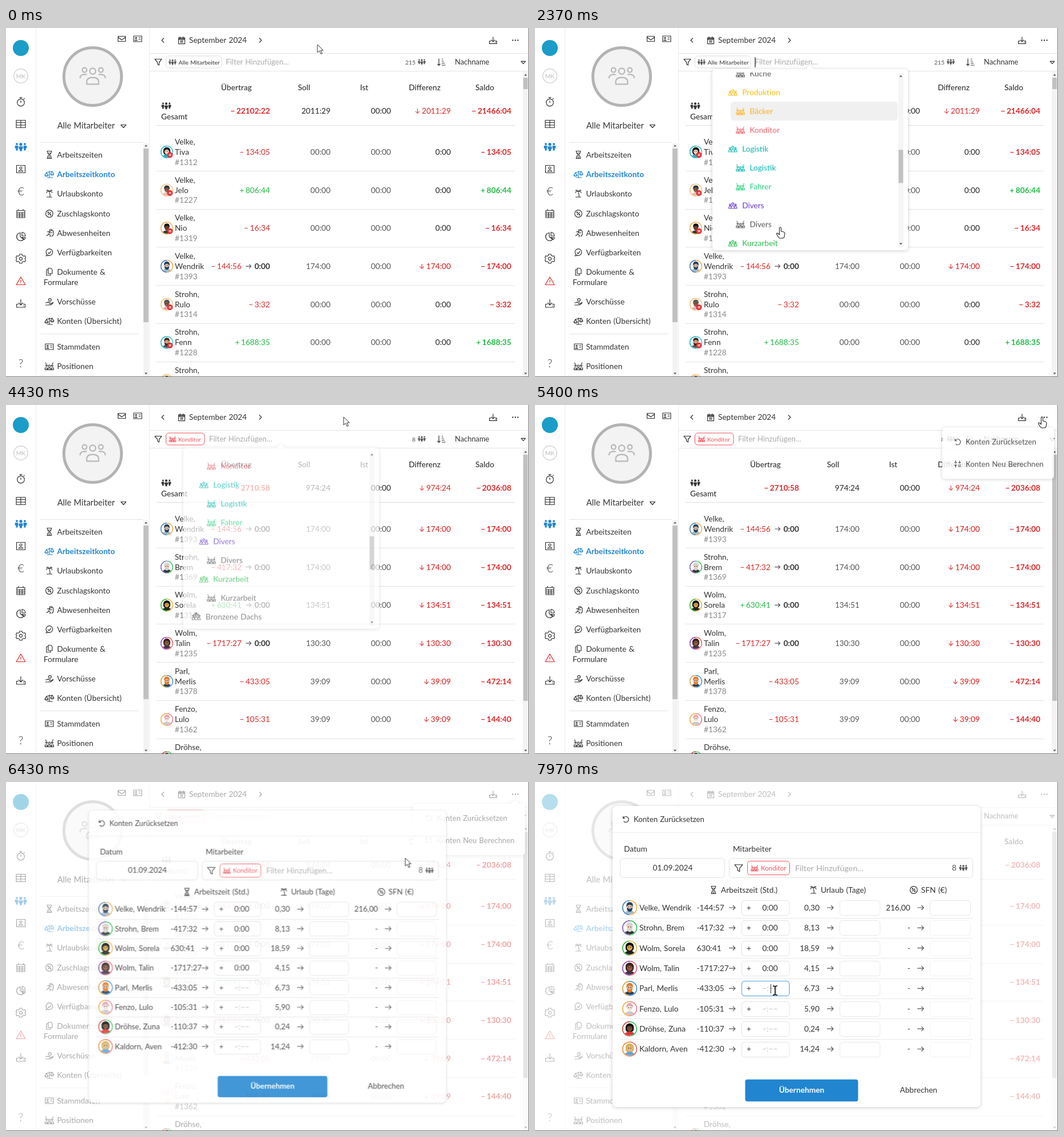
These frames come from a looping animation (917 by 611 pixels, 8000 ms). An HTML page:

```html
<!DOCTYPE html>
<html lang="de">
<head>
<meta charset="utf-8">
<title>Arbeitszeitkonto</title>
<style>
  html, body { margin: 0; width: 100%; height: 100%; overflow: hidden; background: #fff; }
  svg { display: block; }
  text { font-family: Lato, "Open Sans", sans-serif; font-size: 13.7px; fill: currentColor; word-spacing: .06em; white-space: pre; }
  .b { font-weight: 700; }
  .m { font-weight: 500; }
  .e { text-anchor: end; }
  .c { text-anchor: middle; }
  .s { font-size: 10.4px; }
  .hint { font-size: 13.2px; }
  .sign { font-size: 20px; font-weight: 300; }
  .arr { font-family: Inter, sans-serif; font-size: 12px; }
  .popup { filter: drop-shadow(0 1px 3px rgba(0,0,0,.2)); }
  #modal { transform-origin: 458.5px 305px; }
</style>
</head>
<body>
<svg id="stage" width="917" height="611" viewBox="0 0 917 611" color="#333"></svg>
<script>
const LOOP = 8000;
const RED = '#db2828', GREEN = '#21ba45', BLUE = '#2185d0', ROSE = '#f2545b', GREY = '#555', HINT = '#aaa';

// ---- drawing helpers ----
const ring = (x, y, r) => `M${x - r} ${y}a${r} ${r} 0 1 0 ${2 * r} 0a${r} ${r} 0 1 0 ${-2 * r} 0`;
const text = (x, y, s, cls = '', color = '#333') => `<text x="${x}" y="${y + 4.8}" class="${cls}" color="${color}">${s}</text>`;
const path = (d, color = '#333', w = 1.2, fill = 'none') => `<path d="${d}" fill="${fill}" stroke="${color}" stroke-width="${w}" stroke-linejoin="round"/>`;
const box = (x, y, w, h, fill, stroke = 'none', r = 0) => `<rect x="${x}" y="${y}" width="${w}" height="${h}" rx="${r}" fill="${fill}" stroke="${stroke}"/>`;
const hline = (x1, x2, y, color = '#e4e4e4') => path(`M${x1} ${y}H${x2}`, color, 1);
const tri = (x, y, dir) => path(`M${x - 2.5} ${y + 1.5 * dir}h5l-2.5 ${-3 * dir}Z`, 'none', 0, GREY);
const group = (id, s, attrs = '') => `<g id="${id}" ${attrs}>${s}</g>`;

const crew = ring(0, -3, 1.9) + ring(-5, -1, 1.4) + ring(5, -1, 1.4) + 'M-3.5 5Q0-4 3.5 5M-8 5Q-5-2-2.5 3M8 5Q5-2 2.5 3M-8 5.5H8';
const solid = {
  people: ring(0, -4, 2.4) + ring(-6.5, -4.5, 1.8) + ring(6.5, -4.5, 1.8) +
    'M-3.2-.7H3.2V3.5L1.8 4V7H-1.8V4L-3.2 3.5ZM-9.5-1.8H-4.3V2.5H-5V6H-8V2.5H-9.5ZM9.5-1.8H4.3V2.5H5V6H8V2.5H9.5Z',
  dots: ring(-4.5, 0, 1.2) + ring(0, 0, 1.2) + ring(4.5, 0, 1.2)
};
const outline = {
  mail: 'M-6.5-4.5H6.5V4.5H-6.5ZM-6.5-3L0 2L6.5-3',
  card: 'M-7-5H7V5H-7ZM-5 3Q-3 0-1 3ZM1.5-2H5M1.5 1H5' + ring(-3, -1.5, 1.2),
  watch: ring(0, 1.5, 6.3) + 'M-2.5-7.5H2.5M0-7.5V-5M0 2V-2M5-4.5L6.5-6',
  table: 'M-8-6.5H8V6.5H-8ZM-8-2.5H8M-8 2H8M0-6.5V6.5',
  badge: 'M-7.5-6.5H7.5V6.5H-7.5ZM-4 4Q0-1 4 4Z' + ring(0, -2, 2),
  month: 'M-7-5.5H7V7H-7ZM-7-2H7M-7 1H7M-7 4H7M-2.3-2V7M2.3-2V7M-4-8V-5M4-8V-5',
  day: 'M-5-4H5V5.5H-5ZM-5-2.5H5M-5-1.3H5M-2.5-6V-3M2.5-6V-3M-2.5 1H2.5M-2.5 3H2.5',
  pie: 'M-1-6.5A7 7 0 1 0 5 5L-1 .5ZM2-7.5A7 7 0 0 1 8-1H2ZM2 1.5H8Q8 4 6.5 5Z',
  gear: 'M-2-8H2L2.6-5.7L5-4.5L7.3-5.2L8.5-2L7-0L8.5 2L7.3 5.2L5 4.5L2.6 5.7L2 8H-2L-2.6 5.7L-5 4.5L-7.3 5.2L-8.5 2L-7 0L-8.5-2L-7.3-5.2L-5-4.5L-2.6-5.7Z' + ring(0, 0, 2.6),
  warn: 'M0-7L8 6.5H-8ZM0-2V2.5M0 4V5',
  save: 'M0-7V3M-4-1L0 3L4-1M-4 1.5H-7.5V7H7.5V1.5H4M4 4.5H5.5',
  hourglass: 'M-4.5-6.5H4.5M-4.5 6.5H4.5M-3.5-6.5Q-3.5-2 0 0Q3.5 2 3.5 6.5M3.5-6.5Q3.5-2 0 0Q-3.5 2-3.5 6.5M-2-3H2M-2 5H2M-1 3H1',
  scale: 'M0-6V6M-4 6H6M-5-3L5-5M-8 2L-5-3L-2 2ZM2 0L5-5L8 0ZM-8 2Q-5 6-2 2M2 0Q5 4 8 0',
  palm: 'M0-2Q2 2 1 6M-5 6H5M0-3Q-4-6-5-1M0-3Q4-6 5-1M0-3Q-2-8-5-5M0-3Q2-8 5-5',
  percent: ring(0, 0, 6.3) + 'M-2.5 2.5L2.5-2.5' + ring(-2, -2, .8) + ring(2, 2, .8),
  runner: ring(2, -5, 1.5) + 'M-4-2L0-3L2 0L5-1M0-3L-1 2L2 4L1 7M-1 2L-5 5M4-6L7-3V3L4 6',
  chat: ring(0, -.5, 5.8) + 'M-4 3.5L-6 6L-1 5.3M-2.5 0L-.5 2L3-2',
  copy: 'M-2-6.5H3L5-4V3H-2ZM-2-4H-5V6H2V3',
  hand: 'M-7 2H-4Q-2 0 0 2H3M-1 4H3L7 1M-7 6H2L7 2' + ring(1, -3, 2.4),
  crew,
  house: 'M-8-1L0-7L8-1' + crew,
  seats: ring(0, 0, 1.8) + ring(-5, -1, 1.4) + ring(5, -1, 1.4) + 'M-7-6L-5-4M7-6L5-4M-7.5 6V3H-4V6M7.5 6V3H4V6M-2.5 6V3.5H2.5V6M-8 6.3H8',
  tag: 'M-5.5-5H0L5.5 1L1 5.5L-5.5-.5Z' + ring(-3, -2.5, .7),
  filter: 'M-6-5H6L1.5 .5V5.5L-1.5 3.5V.5Z',
  sort: 'M-4-6V6M-6.5 3.5L-4 6L-1.5 3.5M1-5H3M1-1.5H4.5M1 2H6M1 5.5H7.5',
  reset: 'M-4.5-5V-1.5H-1M-4.5-1.5A5 5 0 1 1-3.5 4',
  recalc: 'M-6-2.5H-1M-3.5-6V-1M1-2.5H6M3.5-5.5V-1M-6 2.5H-1M-3.5 1V6M1 2H6M1 4.5H6',
  arrow: 'M-5.5 0H5.5M1.5-4L5.5 0L1.5 4',
  left: 'M2-4L-2 0L2 4',
  right: 'M-2-4L2 0L-2 4',
  down: 'M-4.5-2.5H4.5L0 2.5Z',
  trio: ring(0, -6.5, 4) + ring(-11, -8, 3) + ring(11, -8, 3) + 'M-8 11V8Q-8 2 0 2Q8 2 8 8V11ZM-17 3Q-17-2-11-2H-8M17 3Q17-2 11-2H8'
};
function icon(name, x, y, color = '#333', k = 1, w = 1.2) {
  const shape = solid[name] ? path(solid[name], 'none', 0, color) : path(outline[name], color, w / k);
  return `<g transform="translate(${x} ${y}) scale(${k})">${shape}</g>`;
}

// ring start, ring end, skin, hair, shirt, style
const looks = {
  Tiva: ['#2bb5c4', '#2bb5c4', '#f3d2c0', '#111', '#2aa9b8', 'long'],
  Jelo: ['#f4c27a', '#f4c27a', '#8a5a44', '#333', '#e9b8b0', ''],
  Nio: ['#f0b04a', '#f0b04a', '#6b3f2e', '#111', '#333', ''],
  Wendrik: ['#f2a03c', '#2d7fd0', '#e9bfa5', '#24425f', '#9fb8c8', 'beard'],
  Rulo: ['#f4c27a', '#f4c27a', '#8a5a44', '#555', '#e3a9b4', ''],
  Fenn: ['#2bb5c4', '#2bb5c4', '#e5b08f', '#3b2a22', '#555', 'beard'],
  Brem: ['#21ba45', '#9b59d0', '#f0cdb8', '#d4d4d4', '#333', 'beard'],
  Sorela: ['#e0b030', '#21ba45', '#d6a33f', '#111', '#222', 'long'],
  Talin: ['#e05560', '#8e55c8', '#8a5a44', '#3c241c', '#4a3346', 'long'],
  Merlis: ['#2d7fd0', '#f2b03c', '#e6b48c', '#e07b2c', '#27405e', 'beard'],
  Lulo: ['#ee6a80', '#f2c23c', '#f6e5dc', '#e6a5ae', '#c8c8c8', ''],
  Zuna: ['#21ba45', '#e0404a', '#7a4a35', '#111', '#e0353a', 'long'],
  Aven: ['#e0555a', '#f2a03c', '#e3b58c', '#d8b25a', '#5aa7d8', 'long']
};
function avatar(x, y, k, name, badge) {
  const [a, b, skin, hair, shirt, style] = looks[name];
  const fill = (d, c) => path(d, 'none', 0, c);
  return `<g transform="translate(${x} ${y}) scale(${k})">` +
    path(ring(0, 0, 12), a, 1.4, '#fff') + path('M0-12A12 12 0 0 0 0 12', b, 1.4) + '<g clip-path="url(#face)">' +
    (style === 'long' ? box(-7, -9, 14, 15, hair, 'none', 6) : '') +
    `<ellipse cy="12" rx="9.5" ry="7.5" fill="${shirt}"/><ellipse cy="-1.5" rx="4.8" ry="6" fill="${skin}"/>` +
    fill('M-5.5-1Q-6.5-9.5 0-9.5Q6.5-9.5 5.5-1Q3-5 0-4.8Q-3-5-5.5-1Z', hair) +
    (style === 'beard' ? fill('M-4.9-1Q-5 7 0 7Q5 7 4.9-1Q3 2 0 2Q-3 2-4.9-1Z', hair) : '') +
    fill(ring(-1.9, -1.5, .8) + ring(1.9, -1.5, .8), '#222') + '</g>' +
    (badge ? fill(ring(6.3, 6, 5.7), '#e02b30') + path('M4 4.5H9M4 6H9M4 7.5H9', '#fff', .9) : '') + '</g>';
}

function amount(x, y, v, cls = '') {
  const sign = { '-': '−', '+': '+', v: '↓' }[v[0]];
  if (!sign) return text(x, y, v, 'e ' + cls, cls ? '#333' : GREY);
  return text(x, y, `<tspan class="${v[0] === 'v' ? 'arr' : ''}">${sign}</tspan><tspan dx="2.5">${v.slice(1)}</tspan>`,
    'e ' + cls, v[0] === '+' ? GREEN : RED);
}

// ---- page ----
function rail() {
  const icons = { watch: 129, table: 168, people: 208, badge: 247, month: 325, pie: 365, gear: 404, warn: 443, save: 482 };
  const tint = { people: BLUE, warn: RED };
  return `<circle cx="26" cy="35" r="14" fill="#1c9cc8"/>` + path(ring(26, 84, 12.3), '#ccc', 1.2) + text(26, 83.5, 'MK', 'c s', '#bbb') +
    Object.entries(icons).map(([n, y]) => icon(n, 26, y, tint[n], n === 'people' ? 1.08 : 1)).join('') +
    `<text x="26" y="293" class="c sign">€</text><text x="26" y="594" class="c sign">?</text>` +
    path('M52.5 0V611M251.5 0V611', '#ececec', 1);
}

function sidebar() {
  const items = [['hourglass', 222, 'Arbeitszeiten'], ['scale', 256, 'Arbeitszeitkonto'], ['palm', 290, 'Urlaubskonto'],
    ['percent', 325, 'Zuschlagskonto'], ['runner', 359, 'Abwesenheiten'], ['chat', 393, 'Verfügbarkeiten'],
    ['copy', 427, 'Dokumente &amp;'], ['hand', 479, 'Vorschüsse'], ['scale', 513, 'Konten (Übersicht)'],
    ['card', 558, 'Stammdaten'], ['seats', 592, 'Positionen']];
  return icon('mail', 203, 19) + icon('card', 231, 19) + path(ring(152, 85, 50.5), '#b3b3b3', 5, '#f3f3f3') +
    icon('trio', 152, 84, '#b8b8b8', 1.3, 2.2) +
    `<text x="90" y="176" style="font-size:14.5px">Alle Mitarbeiter</text>` + icon('down', 206, 172) +
    hline(60, 240, 200.5) + hline(60, 233, 535.5) +
    items.map(([n, y, s], i) => icon(n, 76, y, i === 1 ? BLUE : '#333') + text(89.5, y, s, i === 1 ? 'b' : '', i === 1 ? BLUE : '#333')).join('') +
    text(66, 445, 'Formulare') + box(241, 202, 9, 409, '#f3f3f3') + box(241, 211, 9, 304, '#c1c1c1') + tri(245.5, 206, 1) + tri(245.5, 605, -1);
}

const header = () => icon('left', 275, 21.5) + icon('day', 308, 21.5, '#333', 1.1) + text(321, 21.5, 'September 2024') + icon('right', 446, 21.5) +
  icon('save', 854, 21.5, '#333', .85) + icon('dots', 893, 21.5) + hline(252, 917, 44.5) + hline(252, 917, 75.5) +
  icon('filter', 267, 59.5) + icon('people', 729, 59, GREY, .7) + icon('sort', 763, 59.5) +
  `<text x="787" y="64" style="font-size:12.9px">Nachname</text>` + icon('down', 907, 60.5, '#333', .85) +
  [['Übertrag', 404], ['Soll', 522.5], ['Ist', 628], ['Differenz', 734], ['Saldo', 839.5]].map(([s, x]) => text(x, 104, s, 'c m')).join('') +
  icon('people', 281, 136, '#333', .88) + text(272, 155, 'Gesamt', 'm') + hline(264, 892, 170.5, '#ddd') +
  box(906, 77, 10, 534, '#f3f3f3') + tri(911, 82, 1) + tri(911, 605, -1);

const everyone = [
  ['Velke', 'Tiva', 1312, '-134:05', '00:00', '-134:05'], ['Velke', 'Jelo', 1227, '+806:44', '00:00', '+806:44'],
  ['Velke', 'Nio', 1319, '-16:34', '00:00', '-16:34'], ['Velke', 'Wendrik', 1393, '-144:56>', '174:00', '-174:00'],
  ['Strohn', 'Rulo', 1314, '-3:32', '00:00', '-3:32'], ['Strohn', 'Fenn', 1228, '+1688:35', '00:00', '+1688:35'],
  ['Strohn', 'Nio', 1230, '-1:00', '00:00', '-1:00']];
const bakers = [
  ['Velke', 'Wendrik', 1393, '-144:56>', '174:00', '-174:00'], ['Strohn', 'Brem', 1369, '-417:32>', '174:00', '-174:00'],
  ['Wolm', 'Sorela', 1317, '+630:41>', '134:51', '-134:51'], ['Wolm', 'Talin', 1235, '-1717:27>', '130:30', '-130:30'],
  ['Parl', 'Merlis', 1378, '-433:05', '39:09', '-472:14'], ['Fenzo', 'Lulo', 1362, '-105:31', '39:09', '-144:40'],
  ['Dröhse', 'Zuna', 1370, '-110:37', '39:09', '-149:46']];

function accountRow([last, first, id, carry, target, saldo], i) {
  const y = 217 + 66.7 * i, reset = carry.endsWith('>');
  return avatar(282, y, .87, first, target === '00:00') + text(296, y - 18, last + ',') + text(296, y, first) + text(296, y + 17.7, '#' + id, '', '#888') +
    (reset ? amount(413, y, carry.slice(0, -1)) + icon('arrow', 425, y, GREY, .85) + text(463, y, '0:00', 'e b') : amount(463, y, carry)) +
    amount(569, y, target) + amount(675, y, '00:00') + amount(780, y, target === '00:00' ? '0:00' : 'v' + target, 'm') +
    amount(886, y, saldo, 'b') + hline(264, 892, Math.round(y + 33) + .5);
}
const account = (rows, [carry, target, saldo], thumb) => amount(463, 145.5, carry, 'b') + amount(569, 145.5, target, 'm') +
  amount(675, 145.5, '00:00', 'm') + amount(780, 145.5, 'v' + target) + amount(886, 145.5, saldo, 'b') +
  box(907, 87, 8, thumb, '#c1c1c1') + rows.map(accountRow).join('');

const viewAll = () => account(everyone, ['-22102:22', '2011:29', '-21466:04'], 20) + box(280.5, 49, 97.5, 21, '#fff', '#ddd', 5) +
  icon('people', 292, 59.5, GREY, .7) + text(302.5, 58.8, 'Alle Mitarbeiter', 's') + text(385.5, 59.5, 'Filter Hinzufügen...', 'hint', HINT) + text(718, 58.8, '215', 'e s', GREY);
const viewBakers = () => account(bakers, ['-2710:58', '974:24', '-2036:08'], 431) + box(280.5, 49, 67.5, 21, '#fff', ROSE, 5) +
  icon('seats', 292, 59.5, ROSE, .75) + text(302, 58.8, 'Konditor', 's', ROSE) + text(356, 59.5, 'Filter Hinzufügen...', 'hint', HINT) + text(718, 58.8, '8', 'e s', GREY);

// ---- popups ----
const bubble = (x, y, w, h, tip) => `<g class="popup">${path(`M${x + 6} ${y}H${tip - 7}L${tip} ${y - 7}L${tip + 7} ${y}H${x + w - 6}q6 0 6 6v${h - 12}q0 6-6 6h${12 - w}q-6 0-6-6v${12 - h}q0-6 6-6Z`, 'none', 0, '#fff')}</g>`;

function dropdown() {
  const entries = [[0, 'Gelblicher Kranich', GREY], [1, 'Manager', '#b5cc18'], [2, 'Manager', GREY], [1, 'Küche', '#c0785a'], [2, 'Küche', GREY],
    [1, 'Produktion', '#fbbd08'], [2, 'Bäcker', '#fbb11a'], [2, 'Konditor', '#f2606b'], [1, 'Logistik', '#00b5ad'], [2, 'Logistik', '#00b5ad'],
    [2, 'Fahrer', '#21d07a'], [1, 'Divers', '#6435c9'], [2, 'Divers', GREY], [1, 'Kurzarbeit', GREEN], [2, 'Kurzarbeit', GREY], [0, 'Bronzene Dachs', GREY]];
  const list = icon('tag', 333, 101, RED) + text(350, 101, 'Führer of vehicle', '', RED) + hline(317, 636, 125.5) +
    entries.map(([level, s, color], i) => {
      const y = 148 + 33 * i;
      return icon(['house', 'crew', 'seats'][level], 333.5 + 13.3 * level, y, color, .95) + text(350 + 13.2 * level, y, s, '', color);
    }).join('');
  return bubble(311, 72, 343, 317, 482) +
    `<g clip-path="url(#listArea)">${group('list', group('hover', box(343, -16.5, 293, 33, '#f0f0f0', 'none', 6)) + list)}</g>` +
    box(637, 79, 9, 305, '#f5f5f5') + group('thumb', box(637.5, 176, 8, 58, '#c1c1c1')) + tri(641.5, 84, 1) + tri(641.5, 378, -1);
}

const menu = () => bubble(714, 38, 196, 90, 893) + icon('reset', 741, 63) + text(755, 63, 'Konten Zurücksetzen', 'hint') +
  icon('recalc', 741, 102) + text(755, 102, 'Konten Neu Berechnen', 'hint');

function modal() {
  const field = (x, y, w, stroke) => box(x + .5, Math.round(y) - 12.5, w, 26, '#fff', stroke, 5);
  const days = ['0,30', '8,13', '18,59', '4,15', '6,73', '5,90', '0,24', '14,24'];
  const hours = ['-144:57', '-417:32', '630:41', '-1717:27', '-433:05', '-105:31', '-110:37', '-412:30'];
  const people = [...bakers, ['Kaldorn', 'Aven']];
  const rows = people.map(([last, first], i) => {
    const y = 220 + 35.36 * i, preset = i < 4;
    return avatar(166, y, 1.03, first) + text(183, y, `${last}, ${first}`) + text(283.5, y, hours[i]) + icon('arrow', 345.5, y, GREY) +
      field(362, y, 83.5, '#e4e4e4') + text(375, y, '+', 'c') + text(412, y, preset ? '0:00' : '–:––', 'c', preset ? '#333' : '#bbb') +
      text(499, y, days[i], 'e') + icon('arrow', 517.5, y, GREY) + field(534, y, 70.5, '#e8e8e8') +
      text(658, y, i ? '-' : '216,00', 'e') + icon('arrow', 676, y, GREY) + field(692, y, 71, i ? '#f2f2f2' : '#e8e8e8') +
      (i < 7 ? hline(149, 768, Math.round(y + 17.6) + .5, '#e8e8e8') : '');
  }).join('');
  return `<g class="popup">${box(136, 42, 645, 527, '#fff', 'none', 7)}</g>` + icon('reset', 159, 65) + text(173, 65, 'Konten Zurücksetzen', 'hint') + hline(136, 781, 88.5, '#eee') +
    text(156, 117, 'Datum') + text(347, 117, 'Mitarbeiter') + box(149.5, 133.5, 183, 34, '#fff', '#e2e2e2', 6) + text(241.5, 150, '01.09.2024', 'c') +
    box(340.5, 133.5, 427, 34, '#fff', '#e2e2e2', 6) + icon('filter', 357, 150.5, '#333', 1.15) + box(372.5, 138.5, 74, 24, '#fff', ROSE, 5) +
    icon('seats', 385, 150.5, ROSE, .8) + `<text x="396" y="154.5" color="${ROSE}" style="font-size:11.6px">Konditor</text>` +
    `<text x="456" y="155.5" color="${HINT}" style="font-size:14.3px">Filter Hinzufügen...</text>` + text(739, 150, '8', 'e', GREY) + icon('people', 751, 150, GREY, .75) +
    icon('hourglass', 313, 189) + text(326, 189, 'Arbeitszeit (Std.)') + icon('palm', 488, 189) + text(501, 189, 'Urlaub (Tage)') +
    icon('percent', 664, 189) + text(677, 189, 'SFN (€)') + rows +
    group('focus', box(362.5, 348.5, 83.5, 26, 'none', '#4a9fdc', 5) + path('M413.5 354V370', '#333', 1)) +
    box(368.5, 520.8, 198, 38.4, BLUE, 'none', 4) + text(467.5, 539.5, 'Übernehmen', 'c b', '#fff') + text(672.5, 539.5, 'Abbrechen', 'c');
}

const stage = document.getElementById('stage');
stage.innerHTML = `<defs><clipPath id="face"><circle r="11"/></clipPath><clipPath id="listArea"><rect x="317" y="78" width="320" height="306"/></clipPath></defs>` +
  rail() + sidebar() + header() + group('viewAll', viewAll()) + group('viewBakers', viewBakers()) +
  group('caret', path('M386 51V69', '#222', 1.2)) + group('dropdown', dropdown()) + group('menu', menu()) +
  group('veil', box(0, 0, 917, 611, 'rgba(255,255,255,.68)')) + group('modal', modal()) + path('M0 610.5H916.5V0', '#777', 1) +
  group('cursor',
    group('pointer', path('M0 0V14L3.5 10.8L6 16.5L8.3 15.5L5.8 10H10.3Z', '#333', 1, '#fff')) +
    group('beam', path('M-4-8Q0-8 0-6Q0-8 4-8M0-6V6M-4 8Q0 8 0 6Q0 8 4 8', '#000', 1.6)) +
    group('finger', path('M-1.5 1Q0-1.5 1.5 1V7L6 8Q8 8.5 8 11L7 17Q6.5 19 4 19H-1Q-3 18-6.5 11.5Q-6.5 9.5-4 10.5L-1.5 13Z', '#222', 1.1, '#fff')));

// ---- motion: tables of [time, value, easing] ----
function track(id, steps, css, hard) {
  const all = [[0, steps[0][1]], ...steps.filter(s => s[0] > 0), [LOOP, steps[steps.length - 1][1]]];
  document.getElementById(id).animate(
    all.map(([t, v, ease]) => ({ offset: t / LOOP, easing: hard ? 'steps(1, end)' : ease || 'linear', ...css(v) })),
    { duration: LOOP, iterations: Infinity });
}
const move = ([x, y]) => ({ transform: `translate(${x}px, ${y}px)` });
const show = (id, steps) => track(id, steps, on => ({ opacity: on ? 1 : 0 }), true);
const pop = (id, steps) => track(id, steps, v => ({ opacity: v, transform: `translateY(${8 * (1 - v)}px)` }));

show('viewAll', [[0, 1], [3630, 0]]);
show('viewBakers', [[0, 0], [3630, 1]]);
show('caret', [[0, 0], [830, 1], [1330, 0], [1830, 1], [2400, 0], [2930, 1], [3400, 0]]);
show('focus', [[0, 0], [7630, 1]]);
pop('dropdown', [[0, 0], [830, 0, 'ease-out'], [1100, 1], [4350, 1], [4600, 0]]);
pop('menu', [[0, 0], [5200, 0, 'ease-out'], [5500, 1], [7660, 1], [7940, 0]]);

const scroll = [[2200, 0], [2370, 200, 'ease-out'], [2630, 275]];
track('list', scroll, v => move([0, -v]));
track('thumb', scroll, v => move([0, v * .186]));
show('hover', [[0, 0], [1970, 1], [4000, 0]]);
track('hover', [[0, 346], [2640, 610], [3000, 544], [3080, 478], [3180, 445], [3290, 412], [3360, 379]], y => move([0, y]), true);

track('veil', [[0, 0], [6255, 0, 'ease'], [6570, 1]], v => ({ opacity: v }));
track('modal', [[0, 0], [6255, 0, 'ease'], [6570, 1]], v => ({ opacity: v, transform: `scale(${.8 + .2 * v})` }));

const glide = 'ease-in-out';
track('cursor', [[0, [546, 29]], [230, [546, 29], glide], [670, [459, 58]], [1830, [459, 58]], [1970, [430, 349]],
  [2930, [430, 349], glide], [3400, [484, 104]], [3900, [484, 104], 'ease-in'], [4430, [591, 21]], [4700, [848, 23], 'ease-out'],
  [4960, [889, 21]], [5570, [889, 21], glide], [6050, [859, 52]], [6300, [859, 52], glide], [6570, [524, 223]],
  [6770, [524, 223]], [6840, [537, 225], glide], [7300, [392, 345], glide], [7530, [421, 365]]], move);

const kinds = [[0, 'pointer'], [560, 'beam'], [1870, 'finger'], [4060, 'pointer'], [4930, 'finger'], [5620, 'pointer'],
  [6820, 'beam'], [6890, 'pointer'], [7260, 'beam']];
for (const id of ['pointer', 'beam', 'finger']) show(id, kinds.map(([t, k]) => [t, k === id]));
</script>
</body>
</html>
```
